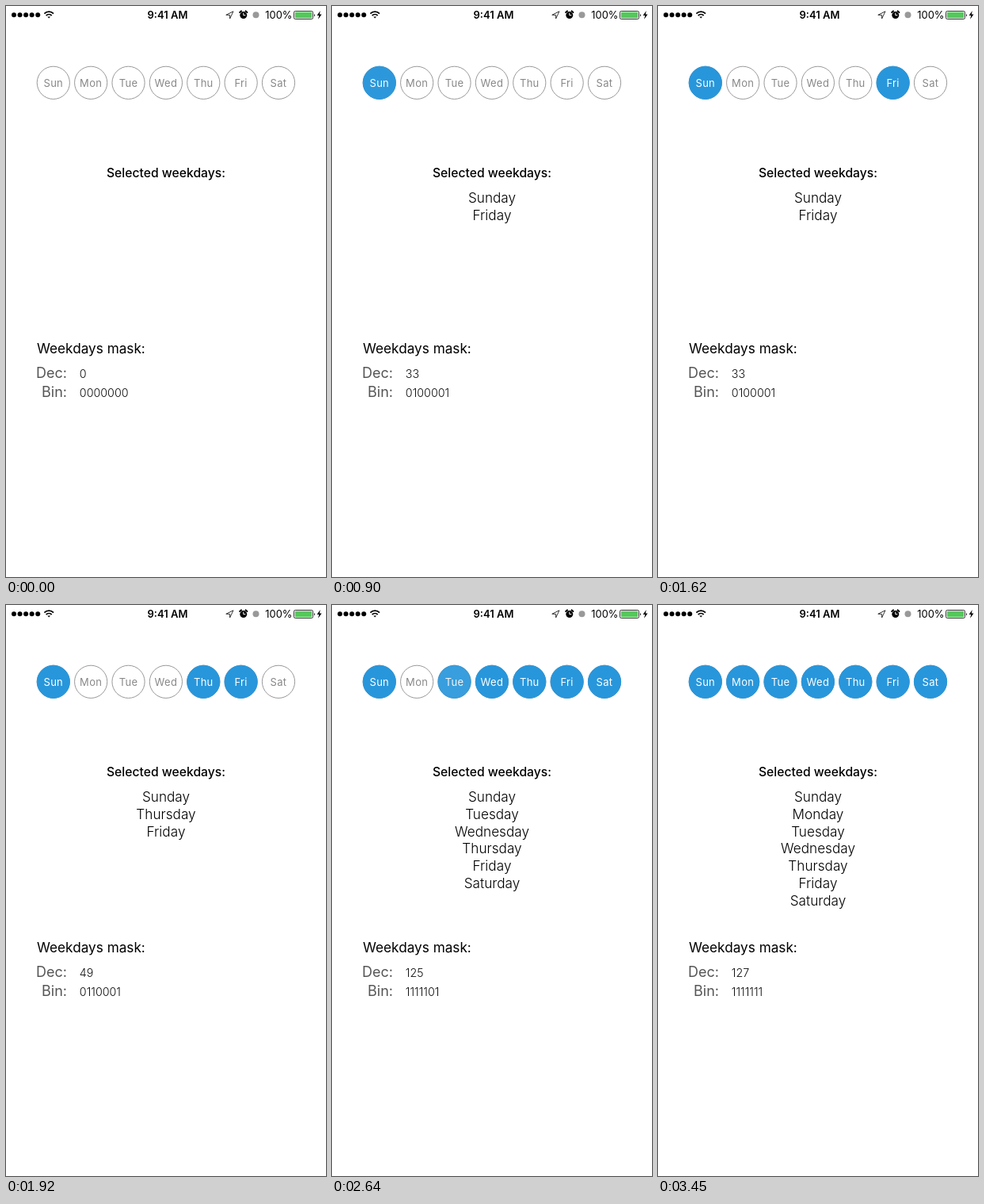
Write an HTML page that moves like this. It is 404 px wide and 720 px high and loops after 3.48 s.

```html
<!DOCTYPE html>
<html lang="en">
<head>
<meta charset="utf-8">
<title>Weekday picker</title>
<style>
  html, body { margin: 0; height: 100%; overflow: hidden; background: #fff; }
  svg { display: block; font-family: Inter, sans-serif; }
  .middle { text-anchor: middle; }
  .day { font-size: 13px; letter-spacing: .3px; text-anchor: middle; }
  .list { font-size: 17.2px; font-weight: 300; text-anchor: middle; }
  .label { font-size: 18px; fill: #555; text-anchor: end; }
  .value { font-size: 14.3px; font-weight: 300; fill: #111; }
</style>
</head>
<body>
<svg width="404" height="720" viewBox="0 0 404 720">
  <g id="signal"></g>
  <g fill="none" stroke="#000" stroke-width="1.8">
    <path d="M48.4 9.6a8.2 8.2 0 0 1 11.6 0"/>
    <path d="M50.7 12a5 5 0 0 1 7 0"/>
    <path d="M52.3 13.4h3.8L54.2 15.6z" fill="#000" stroke="none"/>
  </g>
  <text class="middle" x="204" y="15.6" font-size="13" font-weight="600">9:41 AM</text>
  <path d="M277.8 11.3 287 6.8 282.6 16V11.4z" fill="none" stroke="#333"/>
  <g fill="none" stroke="#000" stroke-width="2" stroke-linecap="round">
    <circle cx="299.8" cy="11.6" r="4.5" fill="#000" stroke="none"/>
    <path d="M295.2 8 297 6.4M304.4 8 302.6 6.4"/>
    <path d="M299.8 9v2.7h2.2" stroke="#fff" stroke-width="1"/>
  </g>
  <circle cx="315.5" cy="11.3" r="4" fill="#999"/>
  <text x="327.3" y="15.6" font-size="12.9">100%</text>
  <rect x="363.5" y="6.5" width="24" height="10" rx="1.8" fill="#fff" stroke="#222" stroke-width=".9"/>
  <rect x="364.8" y="7.8" width="21.4" height="7.4" rx=".7" fill="#55c85c"/>
  <path d="M389 9.5q1.8 2 0 4z"/>
  <path d="M396.8 6 392.6 12h2.6l-1.1 4.8 4.4-6.2h-2.7z"/>

  <g id="days"></g>
  <text class="middle" x="202" y="215.7" font-size="15.7" font-weight="500">Selected weekdays:</text>
  <g id="list"></g>
  <text x="39" y="438.2" font-size="17.2">Weekdays mask:</text>
  <text class="label" x="77" y="469">Dec:</text>
  <text class="label" x="77" y="493">Bin:</text>
  <text class="value" id="dec" x="92.8" y="469.2"></text>
  <text class="value" id="bin" x="92.8" y="493.2"></text>
</svg>
<script>
  const LOOP = 3480, FADE = 230;
  const names = ['Sunday', 'Monday', 'Tuesday', 'Wednesday', 'Thursday', 'Friday', 'Saturday'];
  const taps = [690, 2970, 2450, 2040, 1650, 900, 2255];
  const byId = id => document.getElementById(id);
  const ease = p => p * p * (3 - 2 * p);

  byId('signal').innerHTML = [0, 1, 2, 3, 4]
    .map(i => `<circle cx="${10 + i * 7.55}" cy="11.2" r="3"/>`).join('');

  byId('days').innerHTML = names.map((name, i) => {
    const x = 59.8 + i * 47.37;
    const button = (fill, stroke, ink) => `
      <circle cx="${x}" cy="96.8" r="20.6" fill="${fill}" stroke="${stroke}"/>
      <text class="day" x="${x}" y="101.5" fill="${ink}">${name.slice(0, 3)}</text>`;
    return button('#fff', '#999', '#888') +
      `<g class="on">${button('#2896db', '#2896db', '#fff')}</g>`;
  }).join('');
  const fills = document.querySelectorAll('.on');

  let shownMask = -1;
  function showMask(mask) {
    if (mask === shownMask) return;
    shownMask = mask;
    byId('dec').textContent = mask;
    byId('bin').textContent = mask.toString(2).padStart(7, '0');
    byId('list').innerHTML = names.filter((_, i) => mask >> i & 1)
      .map((name, row) => `<text class="list" x="202" y="${247.7 + row * 21.9}">${name}</text>`).join('');
  }

  function draw() {
    const t = performance.now() % LOOP;
    let mask = 0;
    taps.forEach((tap, i) => {
      if (t >= tap) mask |= 1 << i;
      fills[i].style.opacity = ease(Math.min(1, Math.max(0, (t - tap) / FADE)));
    });
    showMask(mask);
    requestAnimationFrame(draw);
  }
  draw();
</script>
</body>
</html>
```
